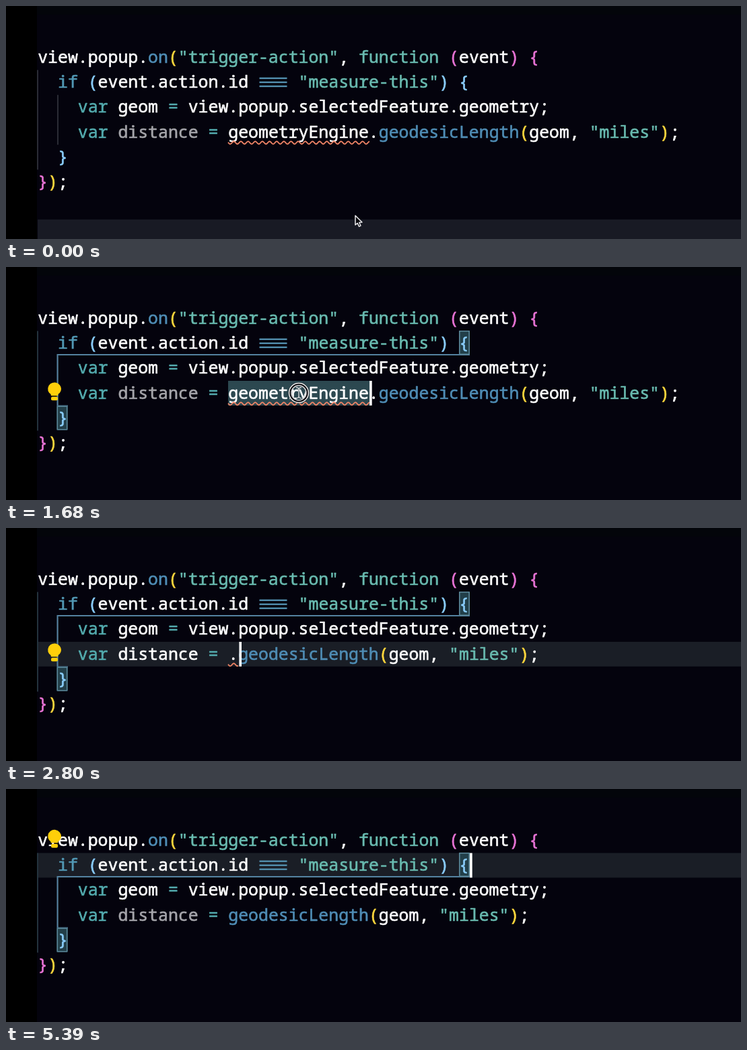
An HTML page with a canvas that plays this animation: 1092 px wide and 348 px high, repeating every 5460 ms.

```html
<!DOCTYPE html>
<html lang="en">
<head>
<meta charset="utf-8">
<title>Editor: removing a namespace</title>
<style>
  html, body { margin: 0; width: 100%; height: 100%; overflow: hidden; background: #000; }
  canvas { display: block; width: 1092px; height: 348px; }
</style>
</head>
<body>
<canvas id="stage" width="1092" height="348"></canvas>
<script>
const ctx = document.getElementById('stage').getContext('2d');
const LOOP = 5460, TICK = 70;
const LEFT = 47.2, TOP = 58.4, CHAR = 14.9, LINE = 37.2;
const CODE = '24.83px "Noto Sans Mono", "DejaVu Sans Mono", monospace';
const UI = '23.6px Inter, "Open Sans", sans-serif';

const C = {
  w: '#ffffff', b: '#4f8db5', t: '#69bbb0', k: '#53abae', y: '#ffd83d',
  p: '#e873d5', l: '#8acdfb', g: '#a5a5aa', i: '#5298b4'
};

// Moments of the story, in ms
const CLICK = 910, MATCH = 1050, BULB = 1190, SELECT = 1610, UNMATCH = 1750,
  HOVER = 2030, CUT = 2520, REMATCH = 2590, STEP = 2660, CUT_DOT = 2870,
  UNUSED = 3220, MOVE = 3430, CLICK_END = 3990, BULB_UP = 4270, HIDE = 4830;

const colX = c => LEFT + c * CHAR;
const lineY = n => TOP + n * LINE;
const within = (t, a, b) => t >= a && t < b;
const ease = (t, a, b) => {
  const u = Math.min(1, Math.max(0, (t - a) / (b - a)));
  return u * u * (3 - 2 * u);
};

function rect(x, y, w, h, color) {
  ctx.fillStyle = color;
  ctx.fillRect(x, y, w, h);
}

// A thin outline gives the code its sturdier stems
function text(str, x, y, color, font = CODE) {
  ctx.font = font;
  ctx.fillStyle = color;
  ctx.fillText(str, x, y);
  if (font !== CODE) return;
  ctx.strokeStyle = color;
  ctx.lineWidth = .6;
  ctx.lineJoin = 'round';
  ctx.strokeText(str, x, y);
}

// A line of code is a list of [colour key, text] runs
function codeLine(n, col, runs) {
  for (const [key, str] of runs) {
    text(str, colX(col), lineY(n) + 26.6, C[key]);
    col += str.length;
  }
}

function drawCode(t) {
  codeLine(0, 0, [['w', 'view.popup.'], ['b', 'on'], ['y', '('], ['t', '"trigger-action"'],
    ['w', ', '], ['t', 'function '], ['p', '('], ['w', 'event'], ['p', ') {']]);
  codeLine(1, 2, [['i', 'if '], ['l', '('], ['w', 'event.action.id     '],
    ['t', '"measure-this"'], ['l', ') {']]);
  for (let i = -1; i < 2; i++) rect(376.5, 112.7 + i * 6, 41, 2.4, '#528fae');
  codeLine(2, 4, [['k', 'var '], ['w', 'geom '], ['k', '= '],
    ['w', 'view.popup.selectedFeature.geometry;']]);
  const name = t < CUT ? 'geometryEngine.' : t < CUT_DOT ? '.' : '';
  codeLine(3, 4, [['k', 'var '], [within(t, CUT, UNUSED) ? 'w' : 'g', 'distance '], ['k', '= '],
    ['w', name], ['b', 'geodesicLength'], ['y', '('], ['w', 'geom, '], ['t', '"miles"'],
    ['y', ')'], ['w', ';']]);
  codeLine(4, 2, [['l', '}']]);
  codeLine(5, 0, [['p', '}'], ['y', ')'], ['w', ';']]);
}

function squiggle(x0, x1) {
  ctx.beginPath();
  for (let x = x0; x <= x1; x++) {
    ctx.lineTo(x, 204.2 + 2 * Math.cos((x - x0 - 3.1) * Math.PI * 2 / 10.63));
  }
  ctx.strokeStyle = '#f08466';
  ctx.lineWidth = 1.8;
  ctx.stroke();
}

function drawGuides(active) {
  rect(46, lineY(1), 2, LINE * 4, active ? '#23323c' : '#2a2c35');
  rect(76, lineY(2), 2, LINE * 2, '#2a2c35');
  if (!active) return;
  const c = '#5482a0';
  rect(76, 130, 613, 2, c);
  rect(75.5, 130, 2, 78, c);
  rect(76, 206.5, 16, 2, c);
}

function bracketBox(x, y) {
  rect(x, y, 16, 36, '#223f49');
  ctx.strokeStyle = '#5a8799';
  ctx.lineWidth = 1.6;
  ctx.strokeRect(x + .8, y + .8, 14.4, 34.4);
}

function drawBulb(n) {
  const y = lineY(n) + 2.2;
  ctx.fillStyle = '#ffcf0a';
  ctx.beginPath();
  ctx.arc(72, y + 10, 9.8, 2.5, .64);
  ctx.quadraticCurveTo(77, y + 17.5, 77, y + 20);
  ctx.lineTo(67, y + 20);
  ctx.quadraticCurveTo(67, y + 17.5, 64, y + 15.6);
  ctx.fill();
  ctx.beginPath();
  ctx.roundRect(67, y + 21.5, 10, 5.6, 2);
  ctx.fill();
}

function drawPopup() {
  rect(330, 14, 677, 160, '#2b2e3a');
  ctx.strokeStyle = '#444a5b';
  ctx.lineWidth = 1.6;
  ctx.strokeRect(330.8, 14.8, 675.4, 158.4);
  rect(331, 70, 675, 1.6, '#41475a');
  rect(331, 124, 675, 1.6, '#41475a');
  text('any', 349, 51, '#f4f4f6');
  text("Cannot find name 'geometryEngine'.", 349, 107, '#f4f4f6');
  text('ts(2304)', 869, 107, '#989aa3');
  text('Peek Problem', 349, 159, '#3d95f2', UI);
  text('Quick Fix...', 529, 159, '#3d95f2', UI);
}

function drawArrow(x, y) {
  ctx.beginPath();
  [[0, 0], [0, 14], [3.2, 11.2], [5.6, 16.4], [8, 15.2], [5.8, 10.2], [10, 10]]
    .forEach(([dx, dy]) => ctx.lineTo(x + dx, y + dy));
  ctx.closePath();
  ctx.fillStyle = '#08080e';
  ctx.fill();
  ctx.strokeStyle = '#e8e8ea';
  ctx.lineWidth = 1.5;
  ctx.stroke();
}

function drawBeam(x, y) {
  ctx.beginPath();
  for (const s of [-1, 1]) {
    ctx.moveTo(x - 4, y + s * 8);
    ctx.quadraticCurveTo(x, y + s * 8, x, y + s * 5);
    ctx.quadraticCurveTo(x, y + s * 8, x + 4, y + s * 8);
  }
  ctx.moveTo(x, y - 6);
  ctx.lineTo(x, y + 6);
  ctx.strokeStyle = '#d6d6d8';
  ctx.lineWidth = 1.4;
  ctx.stroke();
}

function drawRing(x, y) {
  const ring = (r, width, color) => {
    ctx.beginPath();
    ctx.arc(x, y, r, 0, Math.PI * 2);
    ctx.lineWidth = width;
    ctx.strokeStyle = color;
    ctx.stroke();
  };
  ring(13, 5, '#08080c');
  ring(14.5, 1.5, '#f2f2f2');
  ring(11, 1.5, '#d8d8da');
}

function pointerAt(t) {
  if (t < 1050) {
    const u = ease(t, 140, 840);
    return [519 - 57 * u, 313 - 124 * u];
  }
  if (t < MOVE) {
    const u = ease(t, 1050, 1400);
    return [462 - 27 * u, 189 - u];
  }
  if (t < 4060) {
    const u = ease(t, MOVE - 70, 3880), v = 1 - u;
    return [435 + 460 * u, v * v * 188 - 160 * u * v + u * u * 99];
  }
  const u = ease(t, 4060, 4450);
  return [895 - 46 * u, 99 + 190 * u];
}

function drawPointer(t) {
  if (within(t, CUT, MOVE) || t >= HIDE) return;
  const [x, y] = pointerAt(t);
  const presses = [[CLICK, 1050], [1470, 1540], [SELECT, 1750], [3950, 4060]];
  if (presses.some(([a, b]) => within(t, a, b))) drawRing(x, y);
  if (t < 1050 && y > 300) drawArrow(x, y);
  else drawBeam(x, y);
}

function drawCaret(t) {
  if (t < CLICK) return;
  const [since, col, line] =
    t < SELECT ? [CLICK, 28, 3] :
    t < CUT ? [SELECT, 33, 3] :
    t < STEP ? [CUT, 19, 3] :
    t < CUT_DOT ? [STEP, 20, 3] :
    t < CLICK_END ? [CUT_DOT, 19, 3] : [CLICK_END, 43, 1];
  const steady = within(t, SELECT, CUT);
  if (steady || (t - since) % 1000 < 500) rect(colX(col) + 1.2, lineY(line), 3.6, LINE - .4, '#fff');
}

function draw(t) {
  rect(0, 0, 1092, 348, '#000');
  rect(46, 0, 1046, 348, '#04030d');
  rect(46, 0, 1046, 13, '#03050a');

  const selected = within(t, SELECT, CUT);
  const current = t < CLICK ? 7 : t < CLICK_END ? 3 : 1;
  if (!selected) rect(47, lineY(current), 1045, LINE - .4, current === 7 ? '#181a24' : '#1a1e26');
  if (selected) rect(330, lineY(3), 211, LINE - .4, t < HOVER ? '#2c4850' : '#31525a');

  drawGuides(t >= MATCH);
  if (within(t, MATCH, UNMATCH) || t >= REMATCH) {
    bracketBox(673, 95);
    bracketBox(75.5, 207.5);
  }
  drawCode(t);
  if (t < CUT) squiggle(330, 540);
  else if (within(t, REMATCH, CUT_DOT)) squiggle(330, 345);
  drawCaret(t);
  if (t >= BULB) drawBulb(t < BULB_UP ? 3 : 0);
  if (within(t, HOVER, CUT)) drawPopup();
  drawPointer(t);
}

const start = performance.now();
function frame() {
  const t = (performance.now() - start) % LOOP;
  draw(Math.floor(t / TICK) * TICK);
  requestAnimationFrame(frame);
}
frame();
</script>
</body>
</html>
```
